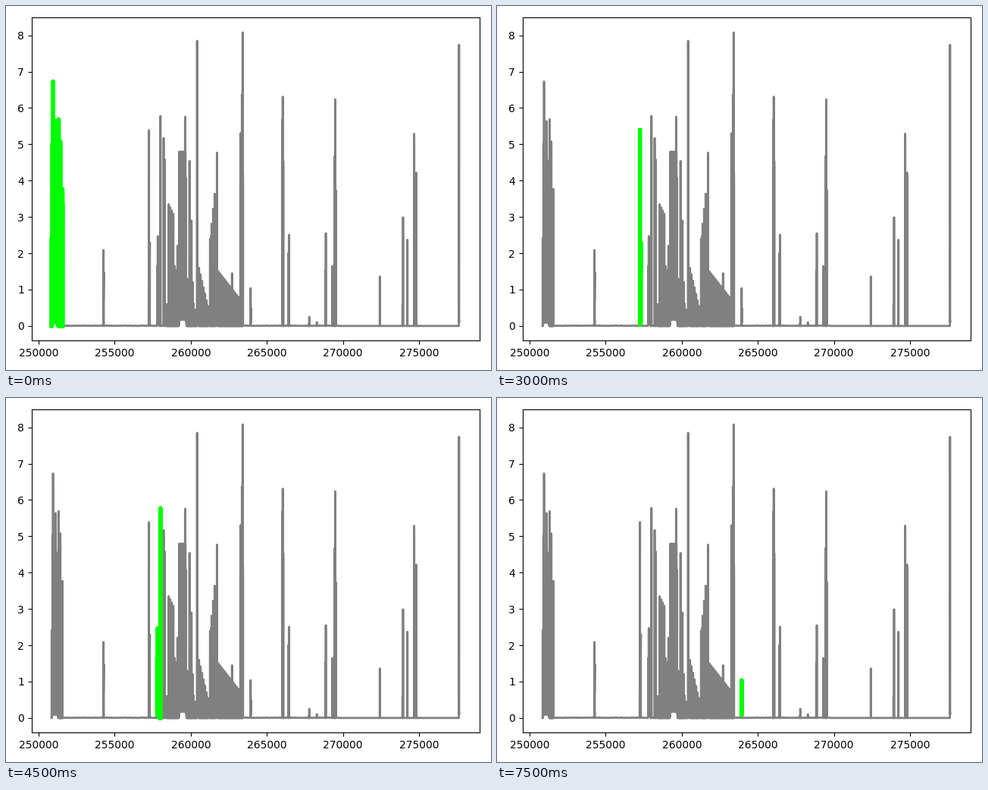
Recreate the animation shown at these times as a matplotlib script. Size 640x480 px, loop 8000 ms.

```python
import random

import matplotlib.pyplot as plt
from matplotlib.animation import FuncAnimation

ORIGIN = 250_000      # times below are counted from here
QUIET_AFTER = 19_800  # the baseline stops jittering here

rng = random.Random(7)
ts, ys = [], []
events = []


def add(*points):
    for t, y in points:
        ts.append(ORIGIN + t)
        ys.append(y)


def spike(t, h, floor=0.0, w=8):
    add((t - w, floor), (t - w, h * 0.98), (t, h), (t + w, h * 0.96),
        (t + w, floor))


def rest(until):
    """Idle baseline with a little sensor jitter."""
    t = ts[-1] - ORIGIN + 8
    while t < until - 8:
        add((t, rng.uniform(0, 0.012) if t < QUIET_AFTER else 0))
        t += 60
    add((until - 8, 0))


def swarm(t0, t1, h0, h1):
    """Dense random peaks below a line from (t0, h0) to (t1, h1)."""
    peaks = []
    for k, t in enumerate(range(t0, t1 + 1, 20)):
        top = h0 + (h1 - h0) * (t - t0) / (t1 - t0)
        peaks.append((t, top * (1 if k % 5 == 0 else rng.uniform(0.4, 0.95))))
    return peaks


def burst(tall, bands, lifted, floor):
    """Tall peaks mixed with swarms; the floor is raised in one interval."""
    peaks = tall + [p for band in bands for p in swarm(*band)]
    for t, h in sorted(peaks):
        low = floor if lifted[0] < t < lifted[1] else 0
        spike(t, h, low, 8 if (t, h) in tall else 4)


def mark(first):
    events.append(slice(first, len(ts)))


# opening burst
add((850, 0))
burst([(862, 2.42), (912, 5.03), (947, 6.73), (1120, 5.64), (1226, 4.55),
       (1315, 5.69), (1425, 5.08), (1562, 3.77)],
      [(960, 1560, 4.3, 3.4)], lifted=(900, 1300), floor=0.1)
mark(0)

# two lone spikes, each highlighted from its peak onwards
rest(4265)
first = len(ts)
add((4265, 2.09), (4265, 0.7), (4285, 1.48), (4285, 0.22))
mark(first)

rest(7240)
add((7240, 1.5), (7248, 0.1))
first = len(ts)
add((7255, 5.39), (7255, 0.03), (7310, 2.3), (7310, 0.15))
mark(first)

# a pair of spikes
rest(7790)
first = len(ts)
burst([(7798, 1.65), (7833, 2.47), (7963, 1.9), (8008, 5.78)], [],
      lifted=(7790, 7900), floor=0.1)
mark(first)

# long busy period
rest(8211)
first = len(ts)
burst([(8217, 5.17), (8292, 4.58), (9632, 5.76), (9916, 4.54), (10046, 2.9),
       (10415, 7.85), (11725, 4.77), (12712, 1.45), (13410, 8.08),
       (13430, 4.2)],
      [(8400, 8520, 0.6, 0.6), (8550, 8890, 3.35, 3.05),
       (8940, 9080, 1.65, 1.5), (9124, 9210, 2.2, 3.6),
       (9248, 9680, 4.8, 4.8), (9740, 10160, 1.3, 1.2),
       (10200, 10390, 0.45, 0.45), (10540, 11180, 1.6, 0.45),
       (11267, 11630, 2.4, 3.9), (11815, 13220, 1.5, 0.75),
       (13260, 13400, 5.3, 6.8)],
      lifted=(9240, 9685), floor=0.17)
mark(first)

# short blip
rest(13928)
first = len(ts)
add((13930, 0.5), (13930, 0.08), (13934, 1.04), (13938, 0.08), (13938, 0.5))
mark(first)

# later spikes: time, height, relative height of the shoulders
later = [(16045, 6.31, 0.9), (16459, 2.51, 0.8), (17789, 0.25, 0.2),
         (18287, 0.1, 0), (18876, 2.55, 0.6), (19315, 1.65, 0),
         (19494, 6.24, 0.75), (22428, 1.36, 0), (23953, 2.99, 0.2),
         (24238, 2.37, 0), (24681, 5.29, 0), (24811, 4.22, 0)]
for t, h, side in later:
    rest(t - 35)
    if side:
        spike(t - 35, h * side)
    spike(t, h)
    if h > 5 and side:
        spike(t + 35, h * side * 0.8)
rest(27632)
add((27632, 7.74), (27636, 0.1), (27640, 0.65), (27640, 0.12))

fig, ax = plt.subplots(figsize=(6.4, 4.8), dpi=100)
ax.plot(ts, ys, color="gray", lw=2)
glow, = ax.plot([], [], color="lime", lw=4)
ax.set_xlim(249_529, 278_985)
ax.set_ylim(-0.4045, 8.4945)
fig.tight_layout()


def draw(i):
    part = events[i // 3]
    glow.set_data(ts[part], ys[part])
    return glow,


anim = FuncAnimation(fig, draw, frames=16, interval=500, repeat=True,
                     repeat_delay=0, init_func=lambda: draw(0))
plt.show()
```
